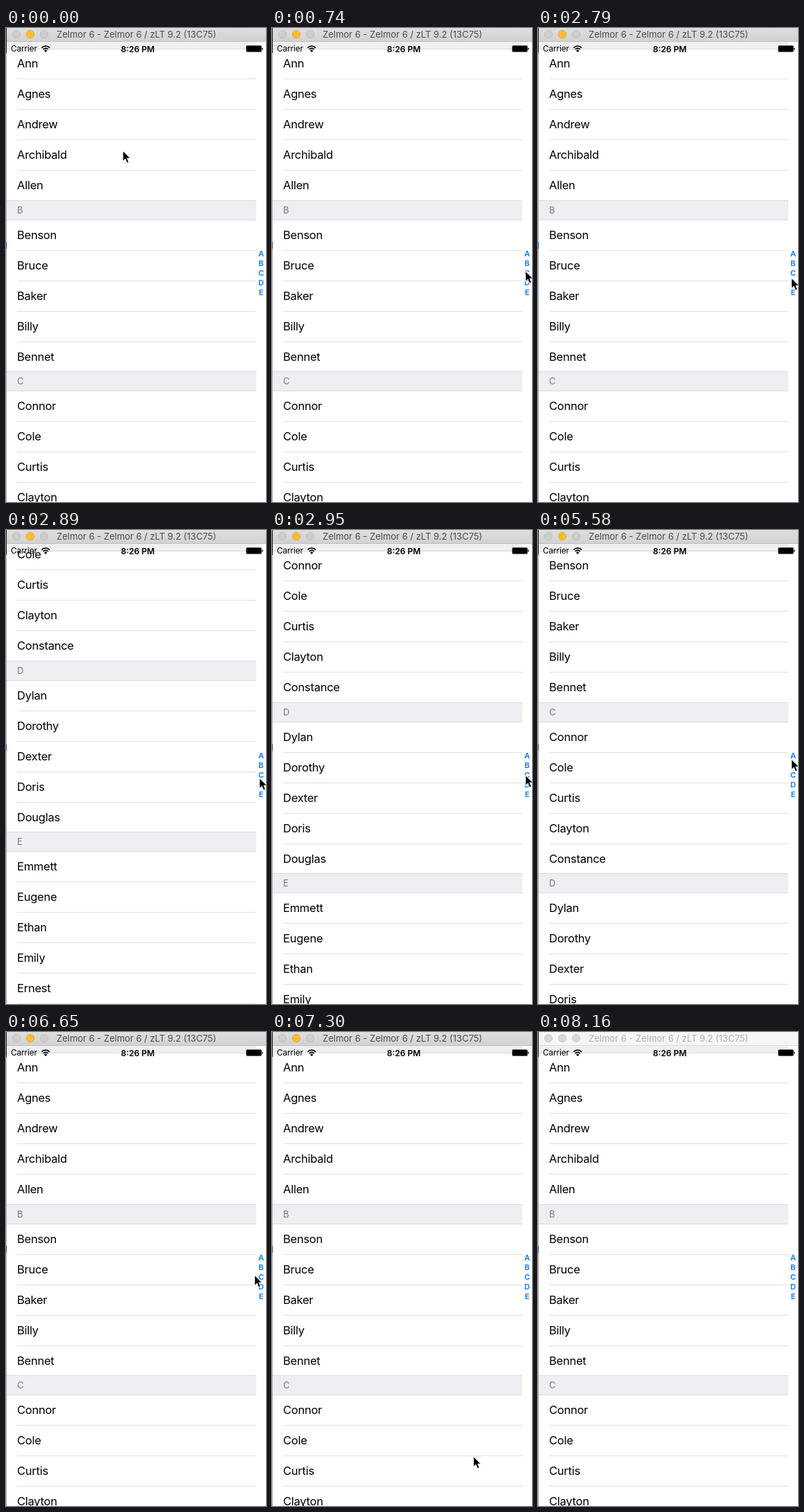
Write an HTML page that moves like this. It is 375x685 px and loops after 8260 ms.

```html
<!DOCTYPE html>
<html lang="en">
<head>
<meta charset="utf-8">
<title>Indexed list</title>
<style>
  * { box-sizing: border-box; }
  html, body { margin: 0; width: 100%; height: 100%; overflow: hidden; background: #fff; }
  #stage {
    position: relative; width: 375px; height: 685px; overflow: hidden;
    background: #fff; color: #000; font-family: Inter, Roboto, sans-serif;
    white-space: nowrap;
  }
  #stage > * { position: absolute; }

  #list { left: 1px; width: 360px; }
  .row {
    height: 43.94px; margin-left: 15px; border-bottom: 1px solid #dfdfe2;
    font-size: 16.5px; line-height: 43px; letter-spacing: -.25px;
  }
  .head {
    position: relative; height: 29px; margin-top: -1px; padding-left: 15px;
    background: #eeeef3; border: solid #d9d9dd; border-width: 1px 0;
    color: #77777c; font-size: 13px; line-height: 27px;
  }
  #pinned { left: 1px; top: 2px; width: 360px; height: 29px; background: #eeeef3; border-bottom: 1px solid #d9d9dd; }

  #index {
    left: 361px; top: 319px; width: 14px; text-align: center;
    color: #007aff; font-size: 11px; font-weight: 600; line-height: 14px;
  }

  .status { top: 23px; font-size: 11.8px; line-height: 15px; }
  #carrier { left: 7px; letter-spacing: -.1px; }
  #clock { left: 140px; width: 100px; text-align: center; font-weight: 600; font-size: 12px; }
  #icons { left: 0; top: 20px; }

  #bar {
    left: 0; top: 0; width: 375px; height: 20px;
    background: linear-gradient(#dedede, #d2d2d2); border-bottom: 1px solid #bdbdbd;
    color: #4b4b4b; font-size: 13px; line-height: 19px;
  }
  #bar span { position: absolute; left: 73px; top: 0; }
  #bar i {
    position: absolute; top: 3px; left: 9px; width: 12px; height: 12px; border-radius: 50%;
    background: #cecece; border: 1px solid #bcbcbc;
  }
  #bar i + i { left: 29px; background: #fdbd2f; border-color: #e2a42c; }
  #bar i + i + i { left: 49px; background: #cecece; border-color: #bcbcbc; }
  #bar.idle { background: #f6f6f6; border-color: #dcdcdc; color: #aeaeae; }
  #bar.idle i { background: #d8d8d8; border-color: #cacaca; }

  #edge {
    left: 0; top: 0; width: 1px; height: 685px;
    background: linear-gradient(#1c1510 36px, #b0b0b0 36px 309px, #17508a 309px 319px, #a8a8a8 319px);
  }
  #cursor { left: 0; top: -1px; overflow: visible; }
</style>
</head>
<body>
<div id="stage">
  <div id="list"></div>
  <div id="pinned"></div>
  <div id="index"></div>
  <div id="carrier" class="status">Carrier</div>
  <div id="clock" class="status">8:26 PM</div>
  <svg id="icons" width="375" height="20">
    <g fill="none" stroke="#000" stroke-width="1.7">
      <path d="M51.4 8.6a8.2 8.2 0 0 1 11.6 0M53.6 10.9a5.1 5.1 0 0 1 7.2 0"/>
    </g>
    <path d="M57.2 15l-2.2-2.3a3.1 3.1 0 0 1 4.4 0z"/>
    <rect x="346.5" y="5.5" width="22" height="9" rx="1.5" fill="none" stroke="#000" stroke-opacity=".6"/>
    <rect x="347" y="6" width="21" height="8" rx="1"/>
    <path d="M369.2 8.4q1.5 0 1.5 1.7t-1.5 1.7z"/>
  </svg>
  <div id="bar"><i></i><i></i><i></i><span>Zelmor 6 - Zelmor 6 / zLT 9.2 (13C75)</span></div>
  <div id="edge"></div>
  <svg id="cursor" width="14" height="20">
    <path d="M1.6 .4V15.4L5 12.2L7.4 18L10.2 16.8L7.8 11.2H12.4Z" fill="#000" stroke="#fff" stroke-linejoin="round"/>
  </svg>
</div>
<script>
  const LOOP = 8260, IDLE_FROM = 8160;
  const SECTION = 5 * 43.94 + 28, LIST_TOP = 30.12, MAX_SCROLL = 2 * SECTION + 60;
  const INDEX_TOP = 319, INDEX_STEP = 14;
  const POINTER_TICK = 40, LAG = 60;
  const $ = id => document.getElementById(id);

  const sections = {
    A: 'Ann Agnes Andrew Archibald Allen',
    B: 'Benson Bruce Baker Billy Bennet',
    C: 'Connor Cole Curtis Clayton Constance',
    D: 'Dylan Dorothy Dexter Doris Douglas',
    E: 'Emmett Eugene Ethan Emily Ernest'
  };
  const letters = Object.keys(sections);

  $('list').innerHTML = letters.map((letter, i) =>
    (i ? `<div class="head">${letter}</div>` : '') +
    sections[letter].split(' ').map(name => `<div class="row">${name}</div>`).join('')
  ).join('');
  $('index').innerHTML = letters.join('<br>');

  // Pointer glides: start, end, target x, target y
  const glides = [
    [60, 260, 316, 329],
    [520, 740, 364, 352],
    [2020, 2380, 364, 362],
    [2850, 2950, 364, 355],
    [3630, 4720, 364, 344],
    [4780, 5040, 364, 340],
    [5300, 5700, 364, 328],
    [6610, 7010, 295, 564],
    [7200, 7400, 281, 690]
  ];
  const touches = [2830, 2890, 4760, 5580];

  function pointer(t) {
    let x = 167, y = 178;
    for (const [start, end, toX, toY] of glides) {
      if (t < start) break;
      const elapsed = Math.floor((t - start) / POINTER_TICK) * POINTER_TICK;
      const p = t >= end ? 1 : elapsed / (end - start);
      x += (toX - x) * p;
      y += (toY - y) * p;
    }
    return [x, y];
  }

  // The list jumps to the index letter under the last touch.
  function scroll(t) {
    const touch = touches.filter(time => time + LAG <= t).pop();
    if (touch === undefined) return 0;
    const letter = Math.floor((pointer(touch)[1] - INDEX_TOP) / INDEX_STEP);
    return Math.min(letter * SECTION, MAX_SCROLL);
  }

  function draw(t) {
    const [x, y] = pointer(t).map(Math.round);
    $('cursor').style.transform = `translate(${x}px, ${y}px)`;
    $('list').style.top = `${LIST_TOP - scroll(t)}px`;
    $('bar').classList.toggle('idle', t >= IDLE_FROM);
  }

  let begin;
  function tick(now) {
    begin ??= now;
    draw((now - begin) % LOOP);
    requestAnimationFrame(tick);
  }
  draw(0);
  requestAnimationFrame(tick);
</script>
</body>
</html>
```
